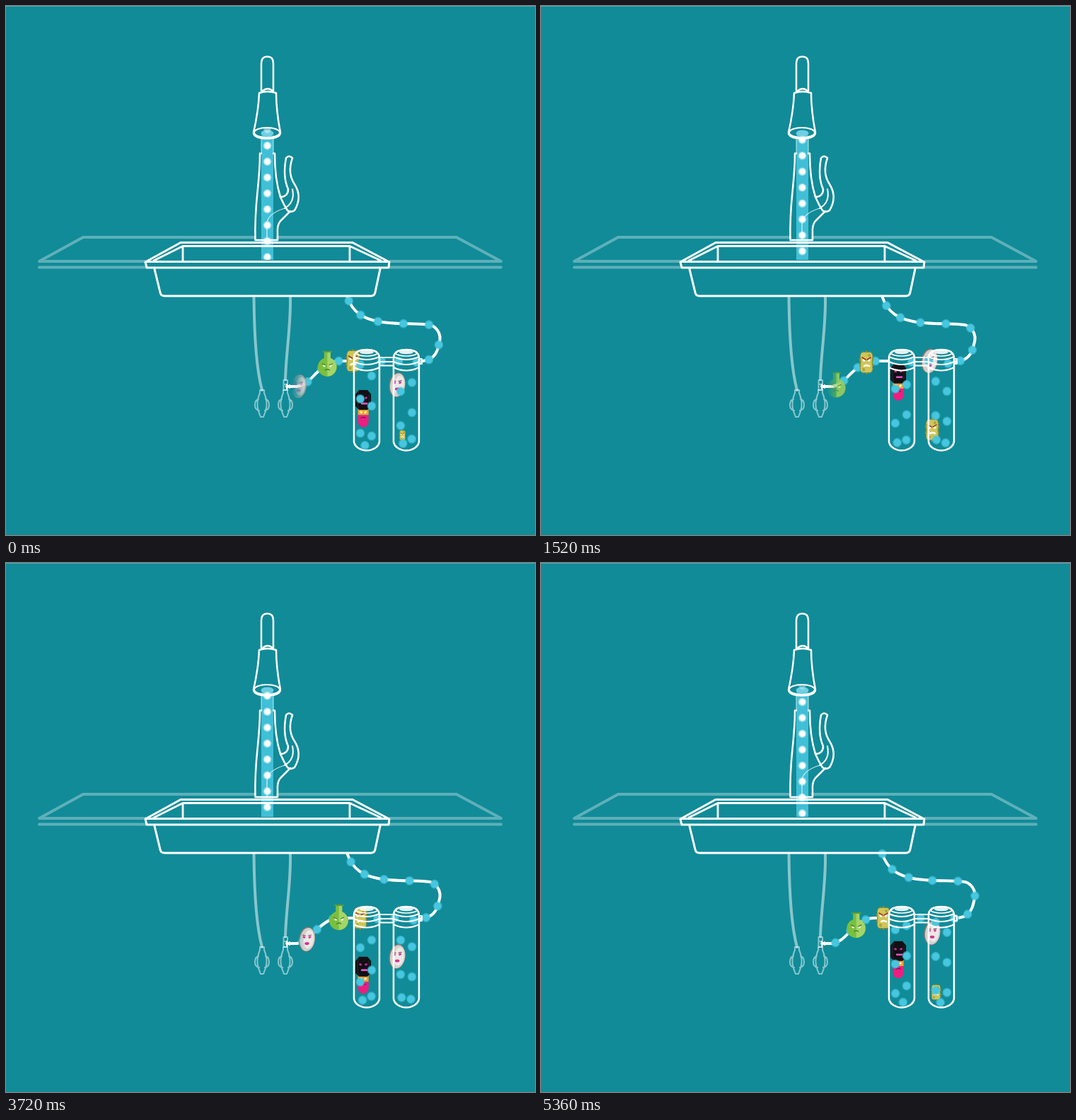
An HTML page with a canvas that plays this animation: 748x748 px, repeating every 5.4 s.

```html
<!DOCTYPE html>
<html>
<head>
<meta charset="utf-8">
<style>
html, body { margin: 0; width: 100%; height: 100%; overflow: hidden; background: #118b98; }
canvas { display: block; }
svg { position: absolute; }
</style>
</head>
<body>
<svg width="0" height="0"><path/></svg>
<canvas id="stage" width="748" height="748"></canvas>
<script>
const stage = document.getElementById('stage');
const layer = stage.cloneNode();
const screen = stage.getContext('2d'), inner = layer.getContext('2d');
let c = screen;

const LOOP = 5400, STEP = 40;
const CYCLE = 45.2;          // steps between two travellers of one kind
const BEAD_RATE = .2555;     // beads leaving the filters per step
const DROP_RATE = .2534;     // drops leaving the spout per step
const INLET_SPEED = 7.2, INLET_BEADS = 12;
const WHITE = '#fff', PALE = 'rgba(255,255,255,.32)', SOFT = 'rgba(255,255,255,.5)', BLUE = '#47c6df';
for (const ctx of [screen, inner]) ctx.lineJoin = ctx.lineCap = 'round';

const clamp = v => Math.max(0, Math.min(1, v));
const line = (d, w = 2.5, color = WHITE) => {
  c.lineWidth = w;
  c.strokeStyle = color;
  c.stroke(new Path2D(d));
};
const fill = (d, color) => {
  c.fillStyle = color;
  c.fill(new Path2D(d));
};
const oval = (x, y, rx, ry, color, tilt = 0) => {
  c.fillStyle = color;
  c.beginPath();
  c.ellipse(x, y, rx, ry, tilt, 0, 7);
  c.fill();
};

function track(d) {
  const path = document.querySelector('path').cloneNode();
  path.setAttribute('d', d);
  return { d, length: path.getTotalLength(), point: s => path.getPointAtLength(s) };
}

// Each leg of the water route takes a number of bead intervals at even speed.
const leg = (d, beads) => ({ ...track(d), beads });
const filterLegs = x => [
  leg(`M${x} 507V604`, 2),
  leg(`M${x} 604C${x} 627 ${x + 16} 627 ${x + 16} 608`, 2),
  leg(`M${x + 16} 608V506`, 2.4)
];
const hose = [
  leg('M598 500Q609 495 612 479', 1),
  leg('M612 479C618 462 606 450 595 450.500C580 448 550 451 526 446', 3),
  leg('M526 446C506 442 490 434 482.500 411', 2.24)
];
const route = [
  ...filterLegs(501), leg('M517 506L530 502H555L558 507', 1.82),
  ...filterLegs(558), leg('M574 506L586 502H592L598 500', 1.38), ...hose
];
const inlet = track('M411 538C426 536 432 525 440 518C452 507 460 502 472 502H560');

function routePoint(u) {
  for (const l of route) {
    if (u < l.beads) return l.point(u / l.beads * l.length);
    u -= l.beads;
  }
  return null;
}

function bead(p) {
  if (!p) return;
  c.globalAlpha = .55;
  oval(p.x, p.y, 6.4, 6.6, BLUE);
  c.globalAlpha = 1;
  oval(p.x, p.y, 5.2, 5.2, BLUE);
}

const eyes = (y, gap, color) => {
  for (const s of [-1, 1]) oval(s * gap, y, 2, 1.5, color, s * -.4);
};

function flask() {
  fill('M-4.500-18H4.500V-9A13.500 13.500 0 1 1-4.500-9Z', '#79bf3f');
  fill('M0-18H4.500V-9A13.500 13.500 0 0 1 0 17Z', '#a4d568');
  line('M-6-18H6', 2, '#5b9d34');
  eyes(2, 4.5, '#e8f6d5');
  line('M-7-1L-3 1M7-1L3 1M-3 8Q0 6 3 8', 1.3, '#4b7b2d');
}
function germ() {
  const spikes = 22, round = v => Math.sign(v) * Math.abs(v) ** .6;
  let d = '';
  for (let i = 0; i < spikes * 2; i++) {
    const a = i * Math.PI / spikes, r = i % 2 ? 1 : .84;
    d += `${i ? 'L' : 'M'}${10.5 * r * round(Math.cos(a))} ${17 * r * round(Math.sin(a))}`;
  }
  fill(d + 'Z', '#8f9138');
  fill('M-5-14H5Q9-14 8-6Q7 0 8 7Q9 14 5 14H-5Q-9 14-8 7Q-7 0-8-6Q-9-14-5-14Z', '#cfc659');
  oval(-4, 10, 2, 2.5, '#aaa53d');
  oval(4, -10, 2, 2, '#aaa53d');
  eyes(-3, 3.6, WHITE);
  line('M-6-7L-1-4M6-7L1-4', 1.5, '#a43022');
  line('M-3 5Q0 3 4 5', 2.4, WHITE);
}
function stone() {
  oval(0, 0, 11.5, 17.5, '#8b7970', .15);
  oval(.5, .3, 10.5, 16.5, '#d3d0cc', .15);
  oval(2.5, 0, 7, 13, '#ebe8e5', .15);
  eyes(-3, 4, '#e0359a');
  line('M-6-6L-2-5M6-6L2-5', 1.2, '#7d5662');
  oval(0, 6, 3.2, 2, '#d93190');
}
function coal() {
  fill('M-6-14H6L11-8V9L6 14H-6L-11 9V-8Z', '#111015');
  line('M-6-13L-8-6V7L-6 13M8-8V8', 1, '#2c2932');
  eyes(-3, 4, '#c328a0');
  line('M-2 5H5', 2.6, '#e456c0');
}
function pill() {
  fill('M-7.500 0V-9.500A7.500 7.500 0 0 1 7.500-9.500V0Z', '#f8a02c');
  fill('M-7.500 0H7.500V9.500A7.500 7.500 0 0 1-7.500 9.500Z', '#ec1e80');
  eyes(-4, 3, '#fff0d0');
  line('M-3 4Q0 2 3 4', 1.6, '#8e174f');
}

// Filters: distance to the drop point, steps to get there, slowing, floor.
const first = { reach: 106, time: 16, power: 1, floor: 592 };
const second = { reach: 154, time: 41.5, power: 1.4, floor: 607 };
const travellers = [
  { draw: pill, start: 14.5, fall: 5.2, filter: first },
  { draw: coal, start: 18.6, fall: 5.2, filter: first },
  { draw: germ, start: 25.5, fall: 6, filter: second },
  { draw: flask, start: 37, fall: 4.7, filter: first },
  { draw: stone, start: 44.7, fall: 8, filter: second }
];

function drawTraveller({ draw, fall, filter }, age) {
  const { reach, time, power, floor } = filter;
  const p = inlet.point(reach * (1 - (1 - clamp(age / time)) ** power));
  const drop = Math.max(0, age - time), bottom = (floor - p.y) / fall;
  const gone = clamp((drop - bottom) / 8);
  if (gone === 1) return;
  const size = 1 - gone * gone;
  c.save();
  c.translate(p.x + 10 * gone, p.y + Math.min(drop, bottom) * fall);
  c.scale(size, size);
  c.globalAlpha = clamp(.35 + age / 3);
  draw();
  c.restore();
}

// Travellers fade in across the mouth of the inlet.
function drawTravellers(phase) {
  c = inner;
  c.clearRect(0, 0, 748, 748);
  for (const who of travellers)
    for (let age = phase - who.start; age < 2 * CYCLE; age += CYCLE)
      if (age >= 0) drawTraveller(who, age);
  const mask = c.createLinearGradient(404, 0, 420, 0);
  mask.addColorStop(0, 'transparent');
  mask.addColorStop(1, '#000');
  c.globalCompositeOperation = 'destination-in';
  c.fillStyle = mask;
  c.fillRect(0, 0, 748, 748);
  c.globalCompositeOperation = 'source-over';
  c = screen;
  c.drawImage(layer, 0, 0);
}

function drawCounter() {
  line('M352 327H109L47 361H197M384 327H637L700 361H543M47 369.500H199M542 369.500H700', 4, PALE);
}

function drawStream(n) {
  c.fillStyle = 'rgba(78,207,232,.78)';
  c.fillRect(361, 183, 17, 176);
  oval(369.5, 180, 9, 4.5, '#6fcfe2');
  c.save();
  c.beginPath();
  c.rect(355, 172, 30, 187);
  c.clip();
  const gap = 22.5, offset = (175 + gap * DROP_RATE * n) % gap;
  for (let y = offset + 7 * gap; y < 366; y += gap) {
    c.globalAlpha = clamp((y - 172) / 8);
    oval(369.5, y, 6, 6, 'rgba(190,238,247,.6)');
    oval(369.5, y, 4.4, 4.4, WHITE);
  }
  c.restore();
}

function drawFaucet() {
  line('M361 120V81Q361 71.500 369.500 71.500T378 81V120');
  line('M358 123Q370 119 382 123Q382 148 388 179Q388 187 369 187.500Q350 187 350 179Q357 148 358 123ZM362 121Q370 113 378 121');
  line('M351 179A18 7 0 0 1 387 179A18 7 0 0 1 351 179Z', 2);
  line('M361 187V208M378 187V208', 1.2, 'rgba(255,255,255,.6)');
  line('M361 208.500H359C359 255 351 275 352.500 331H384V322Q383 310 388 304Q396 296 402 290M378 208.500H380Q380 245 388 270');
  line('M396 215Q400 210 405 215C399 232 402 243 408 252C417 266 414 279 408 289Q402 293 398 289C394 283 391 277 388 270C396 270 399 265 399 259C393 246 393 231 396 215Z');
  line('M405 259C408 273 403 281 394 286', 2);
  line('M394 286Q369 294 369 308V331', 1.3, 'rgba(255,255,255,.75)');
}

function drawSink() {
  line('M247 334.500H490L542 362L541 370H199L197 362Z', 3);
  line('M198 361.500H541M209 360L250 339.500H486L530 360M250 340V360M486 340V360', 2.8);
  line('M210 372L218 405Q219 410 224 410H516Q521 410 522 405L529 372', 3);
}

function drawValves() {
  line('M350.500 412C351 460 353 510 362 543M402 412C403 450 396 490 395 528', 4, SOFT);
  for (const x of [362, 395]) {
    c.save();
    c.translate(x, 0);
    line('M-3 543H3V547C10 564 5 573 2 581H-2C-5 573-10 564-3 547ZM-5 556Q-10 557-10 564T-4 572M5 556Q10 557 10 564T4 572', 2, SOFT);
    c.restore();
  }
  line('M392.500 529H398V543H392.500ZM393 535H398', 2, SOFT);
}

function drawPipes() {
  line('M397 538H411C426 536 432 525 440 518C452 507 460 502 472 502H490', 4);
  line('M397 535V541M401 536V540', 2);
  line('M585 503L598 500', 4);
  for (const part of hose) line(part.d, 4);
}

function drawFilters() {
  line('M528 497H548M528 503H548M528 508.500H548', 2);
  line('M584 499H588V506H584', 2);
  for (const x of [510, 566]) {
    c.save();
    c.translate(x, 0);
    line('M-18 497V616C-17 624-8 628.500 0 628.500S17 624 18 616V497Q17 486 0 486T-18 497Z');
    line('M-18 496Q0 504 18 496M-18 503Q0 511 18 503M-18 511Q0 520 18 511', 2.2);
    line('M-15 490.500A15 4.500 0 0 1 15 490.500A15 4.500 0 0 1-15 490.500', 1.7);
    oval(0, 489.5, 10, 2.8, 'rgba(255,255,255,.88)');
    c.restore();
  }
}

function render(n) {
  const phase = n % CYCLE;
  c.fillStyle = '#118b98';
  c.fillRect(0, 0, 748, 748);
  c.fillStyle = 'rgba(255,255,255,.25)';
  c.fillRect(0, 0, 748, 1);
  drawCounter();
  drawStream(n);
  drawFaucet();
  drawPipes();
  for (let i = 0; i < INLET_BEADS; i++) {
    const s = (phase - 1.4 + i * CYCLE / INLET_BEADS + CYCLE) % CYCLE * INLET_SPEED;
    if (s < 88) bead(inlet.point(s));
  }
  drawTravellers(phase);
  for (let u = n * BEAD_RATE % 1; u < 23; u++) bead(routePoint(u));
  drawSink();
  drawValves();
  drawFilters();
}

const begin = performance.now();
function tick() {
  render(Math.floor((performance.now() - begin) % LOOP / STEP));
  requestAnimationFrame(tick);
}
tick();
</script>
</body>
</html>
```
